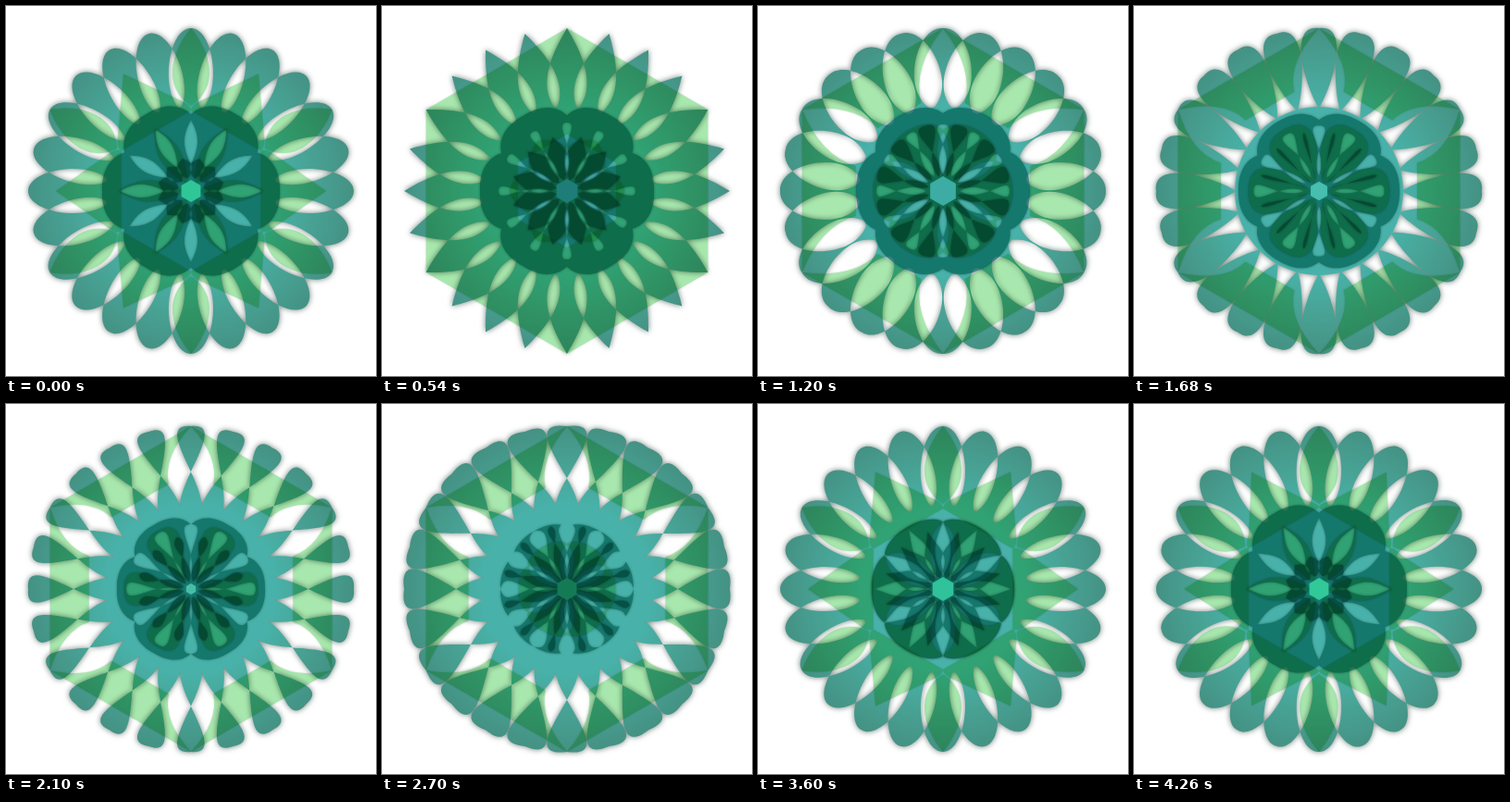
These frames come from a looping animation (400x400 px, 4.32 s). An HTML page with a canvas:

```html
<!DOCTYPE html>
<html lang="en">
<head>
<meta charset="utf-8">
<title>Green mandala</title>
<style>
  html, body { margin: 0; width: 100%; height: 100%; overflow: hidden; background: #fff; }
  canvas { display: block; width: 400px; height: 400px; }
</style>
</head>
<body>
<canvas id="stage" width="400" height="400"></canvas>
<script>
const SIZE = 400, MID = 200, LOOP = 4320, STEP = 60, RIM = 176;
const TIMES = [0, 540, 1200, 2100, 2700, 3600];
const LIGHT = 'rgb(168,232,174)', TEAL = 'rgb(72,172,164)';
const rad = deg => deg * Math.PI / 180;

// Outer petals: base radius, base width, two handles (radius, width), tip radius
const OUTER = [
  [88, 11.6, 110, 34, 176, 24, RIM],
  [88, 11.6, 112, 32, 146, 18, RIM],
  [88, 11.6, 106, 46, 178, 30, RIM],
  [88, -11.6, 118, -14, 180, 40, RIM],
  [88, -11.6, 112, -16, 184, 56, RIM],
  [88, 11.6, 110, 34, 176, 24, RIM]
];

// Pale wedges: corner radius, corner angle, middle radius, inner radius, inner angle, leaf width
const WEDGE = [
  [100, 8, 146, 87, 0, 22],
  [RIM, 0, 152.4, 62, -1, 0],
  [RIM, 0, 152.4, 98, 14, 0],
  [RIM, 0, 152.4, 116, 12, 0],
  [RIM, 0, 152.4, 112, 12, 0],
  [100, 8, 146, 87, 0, 22]
];

// Inner rings: base radius, inner width, outer width, outer handle position, tip radius
const LOBES = [
  [0, 64, 50, 1.02, 96], [0, 60, 52, 1.02, 94], [0, 64, 54, 1, 94],
  [0, 52, 44, 1.02, 80], [0, 56, 44, 1, 72], [0, 58, 50, 1, 77]
];
const HOLES = [
  [28, 10, 9, .65, 77], [16, -12, 16, 1, 74], [18, -16, 20, 1, 72],
  [14, -8, 20, 1, 70], [12, -14, 26, .9, 72], [14, 16, 6, .7, 74]
];
const LEAVES = [
  [10, 16, 13, .65, 78], [8, 36, 24, .8, 62], [8, 48, 40, 1, 75],
  [10, 10, 34, 1, 72], [0, 36, 34, 1, 52], [0, 60, 46, 1, 77]
];
const LACE = [
  [14, 12, 10, .7, 36], [12, 18, 10, .7, 60], [16, -14, 26, 1, 73],
  [8, 14, -16, .8, 58], [8, 18, -14, .9, 70], [12, 20, 6, .6, 64]
];

// Centre: radius, red, green, blue
const HEART = [
  [12, 48, 198, 150], [13, 30, 125, 120], [16, 60, 172, 164],
  [6, 70, 190, 165], [12, 20, 122, 85], [13, 48, 194, 154]
];

const ctx = document.getElementById('stage').getContext('2d');
const newLayer = () => {
  const c = document.createElement('canvas');
  c.width = c.height = SIZE;
  return c.getContext('2d');
};
const shape = newLayer(), shaded = newLayer();

// Smooth periodic curve through the rows of a pose table
function pose(table, t) {
  const n = TIMES.length;
  let i = n - 1;
  while (TIMES[i] > t) i--;
  const at = k => TIMES[(k + n) % n] + LOOP * Math.floor(k / n);
  const row = k => table[(k + n) % n];
  const span = at(i + 1) - at(i), u = (t - at(i)) / span;
  return row(i).map((a, j) => {
    const b = row(i + 1)[j];
    const m0 = (b - row(i - 1)[j]) / (at(i + 1) - at(i - 1)) * span;
    const m1 = (row(i + 2)[j] - a) / (at(i + 2) - at(i)) * span;
    const d = b - a;
    return a + u * (m0 + u * (3 * d - 2 * m0 - m1 + u * (m0 + m1 - 2 * d)));
  });
}

function polar(r, deg) {
  const a = rad(deg);
  return [MID + r * Math.sin(a), MID - r * Math.cos(a)];
}

function petal(path, deg, [r0, w0, r1, w1, r2, w2, tip]) {
  const a = rad(deg), s = Math.sin(a), c = Math.cos(a);
  const p = (r, w) => [MID + r * s + w * c, MID - r * c + w * s];
  path.moveTo(...p(r0, w0));
  path.bezierCurveTo(...p(r1, w1), ...p(r2, w2), ...p(tip, 0));
  path.bezierCurveTo(...p(r2, -w2), ...p(r1, -w1), ...p(r0, -w0));
  path.closePath();
}

function ring(n, turn, p) {
  const path = new Path2D();
  for (let k = 0; k < n; k++) petal(path, turn + k * 360 / n, p);
  return path;
}

function innerRing(n, turn, table, t) {
  const [r, w1, w2, f, tip] = pose(table, t), len = tip - r;
  return ring(n, turn, [r, 0, r + .45 * len, w1, r + f * len, w2, tip]);
}

function wedges(t) {
  const [rt, at, rm, ri, ai, leaf] = pose(WEDGE, t);
  const path = new Path2D(), rc = (rt + ri) / 2;
  for (let d = 0; d < 360; d += 60) {
    path.moveTo(...polar(rt, d + at));
    path.lineTo(...polar(rm, d + 30));
    path.lineTo(...polar(rt, d + 60 - at));
    path.quadraticCurveTo(...polar(rc, d + 60 - ai), ...polar(ri, d + 60 - ai));
    path.lineTo(...polar(ri, d + ai));
    path.quadraticCurveTo(...polar(rc, d + ai), ...polar(rt, d + at));
    path.closePath();
  }
  if (leaf > .5) path.addPath(ring(6, 0, [92, 0, 112, leaf * 1.4, 150, leaf, RIM]));
  return path;
}

// Paints one sheet with a soft edge shadow, then multiplies it onto the stage
function sheet(blur, shade, paint) {
  shape.globalCompositeOperation = 'source-over';
  shape.clearRect(0, 0, SIZE, SIZE);
  paint(shape);
  shaded.clearRect(0, 0, SIZE, SIZE);
  shaded.shadowBlur = blur;
  shaded.shadowColor = `rgba(10,40,30,${shade})`;
  shaded.drawImage(shape.canvas, 0, 0);
  ctx.globalCompositeOperation = 'multiply';
  ctx.drawImage(shaded.canvas, 0, 0);
}

const tealFade = shape.createRadialGradient(MID, MID, 90, MID, MID, RIM);
tealFade.addColorStop(0, 'rgb(72,178,170)');
tealFade.addColorStop(.45, 'rgb(72,164,150)');
tealFade.addColorStop(1, 'rgb(68,146,132)');

function heart(t) {
  const [r, ...rgb] = pose(HEART, t);
  ctx.globalCompositeOperation = 'source-over';
  ctx.fillStyle = `rgb(${rgb.map(Math.round).join()})`;
  ctx.beginPath();
  for (let d = 0; d < 360; d += 60) ctx.lineTo(...polar(r, d));
  ctx.closePath();
  ctx.fill();
}

function draw(t) {
  ctx.globalCompositeOperation = 'source-over';
  ctx.fillStyle = '#fff';
  ctx.fillRect(0, 0, SIZE, SIZE);

  sheet(2, .15, g => {
    g.fillStyle = LIGHT;
    g.fill(wedges(t));
  });
  sheet(6, .6, g => {
    g.fillStyle = tealFade;
    g.fill(ring(24, 0, pose(OUTER, t)), 'evenodd');
    g.beginPath();
    g.arc(MID, MID, 91, 0, 2 * Math.PI);
    g.fill();
  });
  sheet(3, .4, g => {
    g.fillStyle = TEAL;
    g.fill(innerRing(6, 30, LOBES, t));
    g.globalCompositeOperation = 'destination-out';
    g.fill(innerRing(12, 0, HOLES, t), 'evenodd');
  });
  sheet(3, .4, g => {
    g.fillStyle = LIGHT;
    g.fill(innerRing(6, 30, LEAVES, t), 'evenodd');
  });
  sheet(3, .4, g => {
    g.fillStyle = TEAL;
    g.fill(innerRing(12, 15, LACE, t), 'evenodd');
  });
  heart(t);
}

const start = performance.now();
function tick() {
  const t = (performance.now() - start) % LOOP;
  draw(Math.floor(t / STEP) * STEP);
  requestAnimationFrame(tick);
}
tick();
</script>
</body>
</html>
```
